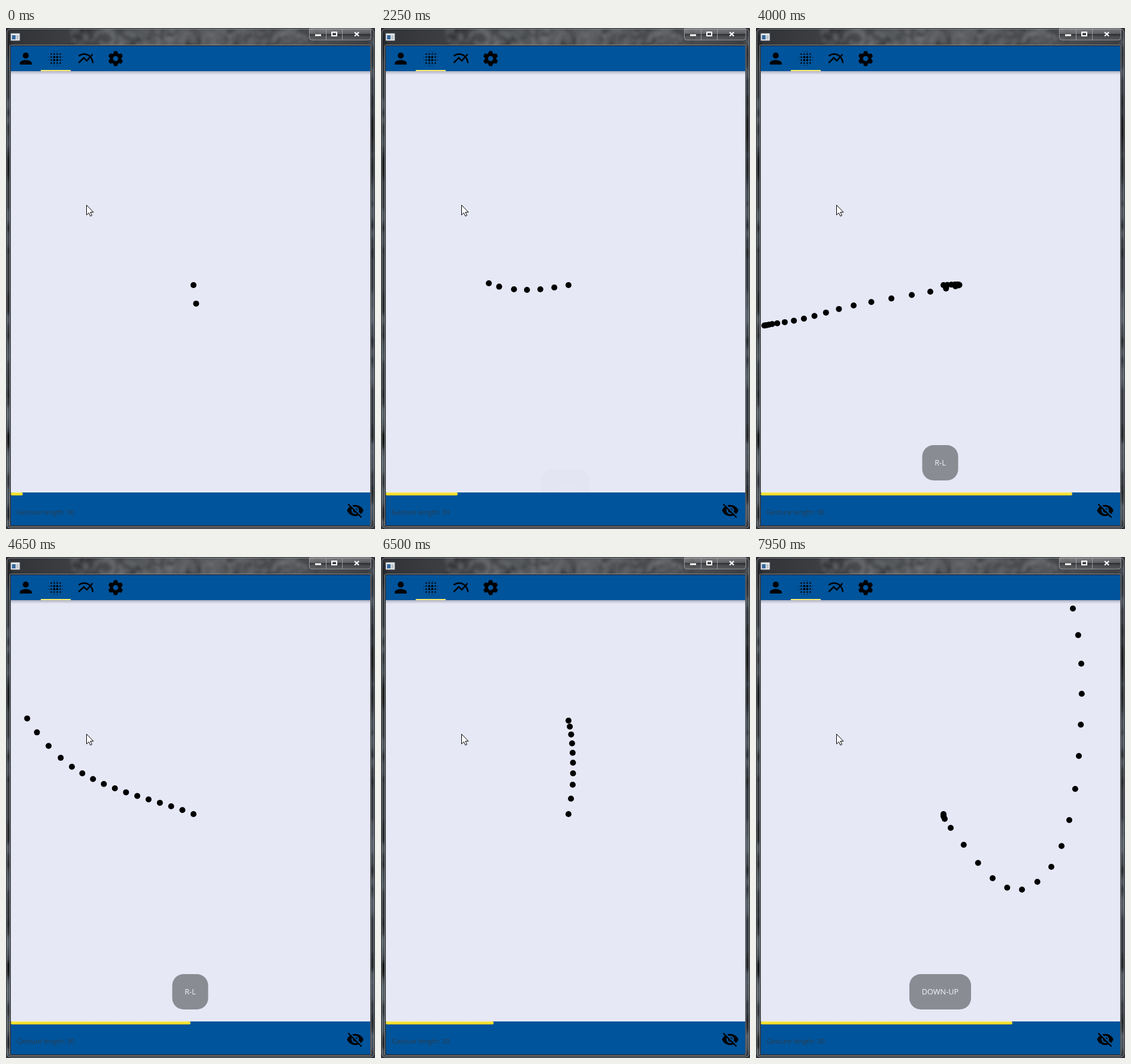
An HTML page for the animation above (8 s loop, 616x836 px).

```html
<!DOCTYPE html>
<html lang="en">
<head>
<meta charset="utf-8">
<title>Gesture recorder</title>
<style>
html, body { margin: 0; width: 100%; height: 100%; overflow: hidden; background: #111; }
svg { display: block; width: 616px; height: 836px; }
text { font-family: "Open Sans", "Noto Sans", sans-serif; }
</style>
</head>
<body>
<svg viewBox="0 0 616 836">
  <defs>
    <filter id="smoke" x="-20%" y="-20%" width="140%" height="140%"><feGaussianBlur stdDeviation="2.5"/></filter>
    <linearGradient id="haze">
      <stop stop-color="#303236"/>
      <stop offset=".25" stop-color="#424447"/>
      <stop offset=".4" stop-color="#5a5c5f"/>
      <stop offset=".75" stop-color="#55575a"/>
      <stop offset="1" stop-color="#3a3c40"/>
    </linearGradient>
    <linearGradient id="shade" x2="0" y2="1">
      <stop stop-color="#66647a" stop-opacity=".42"/>
      <stop offset="1" stop-color="#66647a" stop-opacity="0"/>
    </linearGradient>
    <linearGradient id="glass" x2="0" y2="1">
      <stop stop-color="#fff" stop-opacity=".3"/>
      <stop offset=".48" stop-color="#fff" stop-opacity=".14"/>
      <stop offset=".5" stop-color="#000" stop-opacity=".3"/>
      <stop offset="1" stop-color="#fff" stop-opacity=".06"/>
    </linearGradient>
    <linearGradient id="gold" x2="0" y2="1">
      <stop stop-color="#ffe94a"/><stop offset="1" stop-color="#ead31e"/>
    </linearGradient>
    <clipPath id="view"><path d="M8 72H608V774H8z"/></clipPath>
  </defs>

  <!-- window frame -->
  <rect width="616" height="836" fill="#363b41"/>
  <rect width="616" height="29" fill="url(#haze)"/>
  <g id="backdrop" fill="none" filter="url(#smoke)"></g>
  <rect x=".5" y=".5" width="615" height="835" rx="6" fill="none" stroke="#141517"/>
  <rect x="1.5" y="1.5" width="613" height="833" rx="6" fill="none" stroke="#b4b8bc" stroke-opacity=".7"/>
  <rect x="6.5" y="28.5" width="602.5" height="803" rx="1" fill="#111" stroke="#a9adb2" stroke-opacity=".8"/>
  <rect x="8" y="9" width="15" height="12" fill="#e8ebee" stroke="#878c92" stroke-width=".8"/>
  <rect x="10" y="12" width="6" height="7" fill="#35689c"/>
  <rect x="17" y="12" width="4" height="7" fill="#bfc5ca"/>
  <path d="M506.5 1V16q0 4 4 4H605q4 0 4-4V1z" fill="url(#glass)" stroke="#a7a9ac" stroke-opacity=".85"/>
  <path d="M534.5 1V20M561.5 1V20" stroke="#a7a9ac" stroke-opacity=".85"/>
  <rect x="516" y="10.5" width="10" height="3" fill="#fff"/>
  <rect x="544" y="7" width="8" height="6" fill="none" stroke="#fff" stroke-width="2"/>
  <path d="M582 7l7 6.500M589 7l-7 6.500" stroke="#fff" stroke-width="2.300"/>

  <!-- content -->
  <rect x="8" y="72" width="600" height="703" fill="#e6e8f6"/>
  <rect x="8" y="72" width="600" height="6" fill="url(#shade)"/>
  <rect x="8" y="30" width="600" height="42" fill="#00549b"/>
  <rect x="58" y="70" width="50" height="2" fill="#fdec72"/>
  <g transform="translate(18 36) scale(1.25)">
    <circle cx="12" cy="8" r="4"/>
    <path d="M12 14c-2.670 0-8 1.340-8 4v2h16v-2c0-2.660-5.330-4-8-4z"/>
  </g>
  <g id="blur" transform="translate(68 36) scale(1.25)"></g>
  <g transform="translate(118 36) scale(1.25)" fill="none" stroke="#000" stroke-width="2">
    <path d="M2.700 17.700l6.800-6.700 4 4 7.800-8.800M2.700 8.700C4.700 7 7 6 9.600 6c6.500 0 11.200 4.800 12.100 12"/>
  </g>
  <g id="gear" transform="translate(183 51) scale(1.25)">
    <circle r="5.5" fill="none" stroke="#000" stroke-width="4"/>
  </g>
  <rect x="8" y="775" width="600" height="55" fill="#00549b"/>
  <rect id="bar" x="8" y="775" height="5" rx="2" fill="url(#gold)"/>
  <text x="18" y="812" font-size="11.3" fill="#2c3c4c">Gesture length: 30</text>
  <g transform="translate(568 790) scale(1.25)">
    <path d="M12 4.500C7 4.500 2.730 7.610 1 12c1.730 4.390 6 7.500 11 7.500s9.270-3.110 11-7.500c-1.730-4.390-6-7.500-11-7.500z"/>
    <circle cx="12" cy="12" r="4" fill="none" stroke="#00549b" stroke-width="2"/>
    <path d="M3.500 2.200L21.500 20.200" stroke="#00549b" stroke-width="2"/>
    <path d="M2.600 3.600L20.400 21.400" stroke="#000" stroke-width="1.900"/>
  </g>
  <g id="dots"></g>
  <g clip-path="url(#view)">
    <g id="toast">
      <rect id="pill" y="696" height="59" rx="19" fill-opacity=".4"/>
      <text id="label" x="307.5" y="730" font-size="12.7" fill="#f4f4f6" text-anchor="middle"></text>
    </g>
  </g>
  <path d="M134.500 295.500V312l3.800-3.600 2.600 5.600 2.600-1.200-2.600-5.500h5z" fill="#fff" stroke="#000"/>
</svg>
<script>
const NS = "http://www.w3.org/2000/svg";
const $ = id => document.getElementById(id);
const LOOP = 8000, TICK = 50, STATES = 31;

function add(parent, tag, attrs) {
  const el = parent.appendChild(document.createElementNS(NS, tag));
  for (const name in attrs) el.setAttribute(name, attrs[name]);
  return el;
}

function drawBackdrop() {
  let seed = 7;
  const rnd = () => (seed = seed * 16807 % 2147483647) / 2147483647;
  const g = $("backdrop");
  for (let i = 0; i < 60; i++) {
    add(g, "circle", {
      cx: 110 + rnd() * 400, cy: rnd() * 32, r: 6 + rnd() * 12, stroke: rnd() < .5 ? "#8d8f92" : "#1c1d1f",
      "stroke-width": 3 + rnd() * 3, "stroke-opacity": .15 + rnd() * .25,
      "stroke-dasharray": `${12 + rnd() * 25} 24`
    });
  }
  for (let i = 0; i < 60; i++) {
    add(g, "ellipse", {
      cx: i % 2 ? 612 : 3, cy: 30 + rnd() * 800, rx: 5, ry: 6 + rnd() * 18,
      fill: rnd() < .5 ? "#6a747e" : "#0d0f11", "fill-opacity": .5
    });
  }
}

function drawIcons() {
  const lines = [3, 6, 10, 14, 18, 21];
  for (const x of lines)
    for (const y of lines) {
      const dx = Math.abs(x - 12), dy = Math.abs(y - 12), out = Math.max(dx, dy);
      if (out === 9 && Math.min(dx, dy) > 2) continue;
      add($("blur"), "circle", { cx: x, cy: y, r: out === 9 ? .5 : out === 6 ? 1 : 1.5 });
    }
  for (let a = 0; a < 360; a += 60)
    add($("gear"), "path", { d: "M-3.800-5.500L-2-10H2L3.800-5.500z", transform: `rotate(${a})` });
}

// A smooth hand movement through [x, y, steps since the previous point].
function track(...keys) {
  let k = 0;
  const pts = [[313, 429, 0], ...keys].map(([x, y, n]) => ({ k: k += n, x, y }));
  const slope = (i, c) => {
    const a = pts[Math.max(i - 1, 0)], b = pts[Math.min(i + 1, pts.length - 1)];
    return (b[c] - a[c]) / (b.k - a.k);
  };
  return step => {
    let i = 0;
    while (i < pts.length - 2 && pts[i + 1].k <= step) i++;
    const a = pts[i], b = pts[i + 1], d = b.k - a.k, u = Math.min((step - a.k) / d, 1);
    const mix = c => {
      const m = slope(i, c) * d, n = slope(i + 1, c) * d, e = b[c] - a[c];
      return a[c] + u * (m + u * (3 * e - 2 * m - n + u * (m + n - 2 * e)));
    };
    return [mix("x"), mix("y")];
  };
}

const circle = k => [424 - 111 * Math.cos(k * .282), 429 + 111 * Math.sin(k * .282)];
const wander = track([445, 415, 9], [430, 545, 10], [330, 510, 11]);
const swing = track([266, 436, 2], [222, 436, 2], [180, 426, 2], [150, 382, 9], [320, 400, 15]);
const sweep = track([336, 428, 4], [333, 431, 4], [291, 440, 2], [163, 463, 4], [80, 485, 4], [27, 494, 4], [8, 498, 8]);
const lift = track([110, 350, 11], [21, 230, 6], [130, 107, 10], [165, 150, 3]);
const scoop = track([313, 517, 2], [309, 616, 2], [309, 685, 2], [291, 759, 4], [300, 784, 4], [520, 660, 8], [605, 400, 8]);
const rise = track([320, 380, 2], [319, 311, 4], [313, 273, 3], [305, 255, 4], [303, 264, 17]);
const hook = track([315, 437, 4], [325, 452, 1], [395, 536, 3], [444, 555, 2], [493, 517, 2], [523, 439, 2],
  [539, 332, 2], [543, 178, 3], [529, 86, 2], [515, 50, 1]);
const gestures = [circle, wander, swing, sweep, lift, scoop, rise, hook];

const toasts = [
  { text: "CIRCLE", width: 81, from: 0, to: 2285 },
  { text: "R-L", width: 60, from: 3130, to: 6450 },
  { text: "DOWN-UP", width: 103, from: 7220, to: 9000 }
];

// About 30 samples per second, with one stalled tick.
const samples = t => Math.floor(1.38 + .03003 * (t > 2250 ? t - TICK : t));

function drawToast(t) {
  const item = toasts.find(s => t > s.from && t < s.to);
  $("toast").setAttribute("visibility", item ? "visible" : "hidden");
  if (!item) return;
  const show = Math.min(1, (t - item.from) / 300, (item.to - t) / 300);
  $("toast").setAttribute("transform", `translate(0 ${52 * (1 - show) ** 2})`);
  $("toast").setAttribute("opacity", show ** 1.6);
  $("pill").setAttribute("x", 307.5 - item.width / 2);
  $("pill").setAttribute("width", item.width);
  $("label").textContent = item.text;
}

drawBackdrop();
drawIcons();
const dots = Array.from({ length: STATES }, () => add($("dots"), "circle", { r: 5 }));

function draw(time) {
  const t = Math.floor(time % LOOP / TICK) * TICK;
  const n = samples(t), k = n % STATES;
  const at = gestures[Math.floor(n / STATES)];
  dots.forEach((dot, i) => {
    dot.setAttribute("visibility", i <= k ? "visible" : "hidden");
    const [x, y] = at(i);
    dot.setAttribute("cx", x);
    dot.setAttribute("cy", y);
  });
  $("bar").setAttribute("width", k * 20);
  drawToast(t);
}

const start = performance.now();
function loop() {
  draw(performance.now() - start);
  requestAnimationFrame(loop);
}
loop();
</script>
</body>
</html>
```
